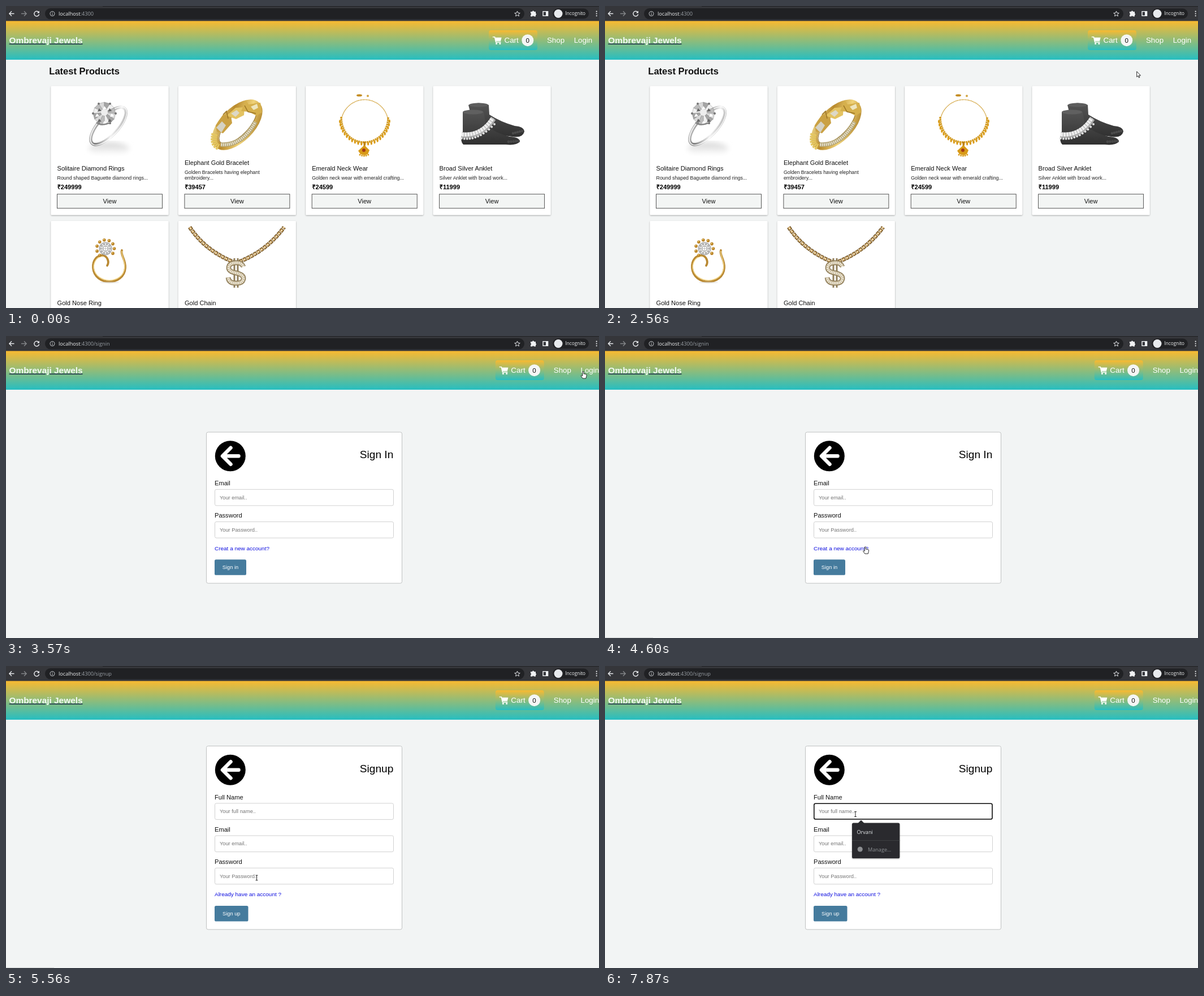
These frames come from a looping animation (1049x534 px, 8 s). An HTML page:

```html
<!DOCTYPE html>
<html lang="en">
<head>
<meta charset="utf-8">
<title>Jewellery shop</title>
<style>
html, body { margin: 0; width: 100%; height: 100%; overflow: hidden; background: #f2f4f4; }
svg { display: block; width: 100vw; height: 100vh; }
text { font-family: "Liberation Sans", Arial, sans-serif; white-space: pre; }
.ui text { font-family: "Open Sans", "Noto Sans", sans-serif; }
</style>
</head>
<body>
<svg id="stage" viewBox="0 0 1049 534"></svg>
<script>
const LOOP = 8000;
const stage = document.getElementById('stage');

const text = (x, y, size, str, fill = '#111', more = '') =>
  `<text x="${x}" y="${y}" font-size="${size}" fill="${fill}" ${more}>${str}</text>`;
const rect = (x, y, w, h, fill, more = '') =>
  `<rect x="${x}" y="${y}" width="${w}" height="${h}" fill="${fill}" ${more}/>`;
const circle = (x, y, r, fill, more = '') =>
  `<circle cx="${x}" cy="${y}" r="${r}" fill="${fill}" ${more}/>`;
const shape = (d, fill, more = '') => `<path d="${d}" fill="${fill}" ${more}/>`;
const line = (d, color, w, more = '') =>
  `<path d="${d}" fill="none" stroke="${color}" stroke-width="${w}" ${more}/>`;
const oval = (x, y, rx, ry, turn, more) =>
  `<ellipse rx="${rx}" ry="${ry}" transform="translate(${x} ${y}) rotate(${turn})" ${more}/>`;
const repeat = (n, fn) => Array.from({ length: n }, (_, i) => fn(i)).join('');
const polar = (x, y, r, deg) => {
  const a = deg * Math.PI / 180;
  return [(x + r * Math.cos(a)).toFixed(1), (y + r * Math.sin(a)).toFixed(1)];
};
const gradient = (id, stops, dir = 'x2="0" y2="1"') =>
  `<linearGradient id="${id}" x1="0" y1="0" ${dir}>` +
  stops.map((c, i) => `<stop offset="${i / (stops.length - 1)}" stop-color="${c}"/>`).join('') +
  '</linearGradient>';

const defs = `<defs>
  ${gradient('sky', ['#f9ba31', '#27bec1'])}
  ${gradient('silver', ['#eeeeee', '#777777', '#f4f4f4', '#999999'], 'x2="1" y2="1"')}
  ${gradient('gold', ['#f3df92', '#b98a2c', '#f0d37a', '#a87a22'], 'x2="1" y2="1"')}
  ${gradient('foot', ['#555555', '#303030'])}
  ${gradient('mirror', ['#d2d2d2', '#ffffff'])}
  <filter id="shade" x="-10%" y="-10%" width="120%" height="120%">
    <feDropShadow dx="0" dy="1" stdDeviation="1.3" flood-opacity=".38"/>
  </filter>
  <filter id="blur"><feGaussianBlur stdDeviation="5"/></filter>
</defs>`;

// Browser toolbar
const toolbar = `<g class="ui">
  ${rect(0, 0, 1049, 27, '#35363a')}${rect(171, 0, 878, 1, '#202124')}
  ${rect(69, 4, 848, 19.5, '#202124', 'rx="9.7"')}
  ${line('M14.5 13.5H6M10 9.3L5.8 13.5L10 17.7', '#e8eaed', 1.3)}
  ${line('M27 13.5H36M32 9.3L36.2 13.5L32 17.7', '#85878a', 1.3)}
  ${line('M57.8 11A4.4 4.4 0 1 0 58.6 14.5', '#e8eaed', 1.4)}${shape('M59 8.6V12.6H55Z', '#e8eaed')}
  ${circle(82, 13.7, 4, 'none', 'stroke="#c4c7ca"')}${line('M82 13V16M82 11V12', '#c4c7ca', 1)}
  ${text(93, 17, 9.2, 'localhost<tspan fill="#9aa0a6">:4300<tspan id="path"></tspan></tspan>', '#f1f3f4')}
  <polygon points="${repeat(10, i => polar(904.5, 14, i % 2 ? 2.2 : 5, i * 36 - 90) + ' ')}" fill="none" stroke="#dfe1e5"/>
  ${shape('M928 10H931V9.5A1.6 1.6 0 0 1 934 9.5V10H937V13A1.6 1.6 0 0 1 937 16V18.5H934A1.6 1.6 0 0 0 931 18.5H928V15.7A1.6 1.6 0 0 0 928 12.7Z', '#f1f3f4')}
  ${rect(950, 9.7, 8.6, 7.6, 'none', 'stroke="#f1f3f4" stroke-width="1.4"')}${rect(955, 9.7, 3.6, 7.6, '#f1f3f4')}
  ${rect(967, 4.5, 64, 18, '#202124', 'rx="9"')}${circle(977, 13.5, 7.5, '#e8eaed')}
  ${text(989.5, 16.4, 8.2, 'Incognito', '#f1f3f4')}
  ${repeat(3, i => circle(1044.7, 9.7 + i * 3.8, 1.1, '#e8eaed'))}
</g>`;

const header = `${rect(0, 26.5, 1049, 68.5, 'url(#sky)')}
  ${text(5.5, 65.5, 15.4, '<tspan fill="#f4faf4">Ombrevaji Jewels</tspan>', '#1d3048', 'font-weight="bold" text-decoration="underline"')}
  <g id="nav">
    ${rect(854, 43, 86, 35, 'url(#sky)', 'rx="4"')}
    ${line('M861.5 54.7H864.5L866.7 64H875', '#fff', 1.6, 'stroke-linejoin="round" stroke-linecap="round"')}
    ${shape('M864.8 55.7H876.6L875 62.2H866.3Z', '#fff')}
    ${circle(867.6, 66.4, 1.5, '#fff')}${circle(873.9, 66.4, 1.5, '#fff')}
    ${text(881.5, 65.2, 13.4, 'Cart', '#fff')}
    ${circle(922.8, 60.7, 10.5, '#f4f6f5')}${text(922.8, 64.8, 11.6, '0', '#111', 'text-anchor="middle"')}
    ${text(957, 65.2, 13.3, 'Shop', '#fff')}${text(1004.7, 65.2, 13.3, 'Login', '#fff')}
  </g>`;

// Product pictures
const spin = (x, y, r, n, fn) => repeat(n, i => fn(...polar(x, y, r, i * 360 / n), i));

const diamondRing = `
  ${oval(182, 252, 36, 11, 0, 'fill="url(#mirror)" filter="url(#blur)"')}
  ${oval(181, 212, 42, 17, -47, 'fill="none" stroke="url(#silver)" stroke-width="5.5"')}
  ${oval(181.5, 212, 43, 18, -47, 'fill="none" stroke="#fff" stroke-width="1.3"')}
  ${spin(174, 190, 20, 12, (x, y, i) => {
    const [u, v] = polar(174, 190, 20, (i + 1) * 30);
    return shape(`M174 188L${x} ${y}L${u} ${v}Z`, ['#d9d9d9', '#a5a5a5', '#f0f0f0', '#bcbcbc'][i % 4], 'stroke="#777" stroke-width=".4"');
  })}
  ${spin(174, 190, 13, 8, (x, y, i) => shape(`M${x} ${y}l4 5l-7 1z`, i % 2 ? '#666' : '#fff'))}
  ${circle(174, 188, 6, '#eee')}
  ${spin(174, 190, 20, 6, (x, y) => circle(x, y, 2, '#777'))}
  ${line('M160 206Q168 213 182 207', '#888', 2.5)}`;

const bracelet = `
  ${oval(409, 210, 49, 24, -45, 'fill="none" stroke="url(#gold)" stroke-width="12"')}
  ${oval(410, 211, 43, 18, -45, 'fill="#fff" stroke="#92712d" stroke-width="1"')}
  ${line('M380 245Q417 248 441 205', '#b5a574', 8)}
  ${line('M380 245Q417 248 441 205', '#e5e0cf', 5, 'stroke-dasharray="2 1.5"')}
  ${line('M369 226Q364 245 377 250', '#e5c761', 11, 'stroke-dasharray="3 1"')}
  ${shape('M371 211L384 192L398 195L400 207L384 225L373 222Z', '#caa144')}
  ${shape('M372 215L382 204L389 211L381 224Z', '#d5d2c4')}
  ${shape('M390 194L406 180L422 179L421 193L407 200Z', '#e4c362')}
  ${shape('M398 190L408 184L413 189L406 196Z', '#ddd8c7')}
  ${shape('M416 186L424 166L429 174L450 171L453 188L443 194L430 187Z', '#d6b04d')}
  ${shape('M433 178L444 173L446 180L438 184Z', '#eee5bd')}
  ${line('M384 192L390 186L393 199M422 176L428 187L442 190', '#9b7425', 1.5)}`;

const necklace = `
  ${line('M593 202A42 43 0 0 1 676 202', '#d3a643', 1.4, 'stroke-dasharray="2 .5"')}
  ${line('M593 196C593 226 614 241 634 241S676 226 676 196', '#d39c25', 3.5, 'stroke-dasharray="3 .8"')}
  ${repeat(23, i => {
    const [x, y] = polar(634.5, 200, 44, 5 + i * 7.7);
    return oval(x, y, 1.6, 3, 0, 'fill="#d99b18"');
  })}
  ${oval(625, 158, 5, 2, 0, 'fill="#c58e25"')}${circle(640, 159, 2, '#d3a643')}
  ${line('M634 240V250', '#b97d11', 3)}
  ${shape('M634 246L643 255L640 262L634 264L627 262L623 256Z', '#d89a17')}
  ${circle(633, 255, 3, '#a53b18')}${repeat(5, i => circle(626 + i * 3.7, 263 + 2 * Math.sin(i * .78), 1.5, '#d89a17'))}`;

const anklet = `
  ${shape('M818 175Q836 168 854 175L855 192Q875 205 900 212Q916 213 917 222Q914 234 896 231L830 222Z', 'url(#foot)')}
  ${shape('M808 188Q826 180 845 187L849 211Q865 224 891 231Q909 232 909 240Q903 247 884 245L809 245Q802 238 808 222Z', 'url(#foot)')}
  ${oval(836, 175, 17, 3.5, 0, 'fill="#5d5d5d"')}${oval(826, 187.5, 18, 4, 0, 'fill="#606060"')}
  ${repeat(5, i => circle(889 + i * 4.4, 240 - i * .3, 2.4, '#484848') + circle(897 + i * 4, 225 - i, 2.2, '#4c4c4c'))}
  ${line('M806 228Q842 232 862 199', '#aaa', 10)}
  ${line('M806 227Q841 230 861 198', '#eee', 7, 'stroke-dasharray="4 1"')}
  ${repeat(13, i => {
    const p = i / 12;
    return circle(806 + 58 * p, 234 + 11 * p - 36 * p * p, 2, '#ddd');
  })}`;

const noseRing = `
  ${line('M205 432C202 440 212 448 211 463C209 495 157 496 154 463C153 450 161 440 172 441C180 443 183 453 179 459', '#b98933', 3.8, 'stroke-linecap="round"')}
  ${line('M205 433C203 440 211 449 210 463C207 492 160 493 155 463C155 451 162 442 172 443', '#f1d487', 1.5)}
  ${spin(176, 429, 15.5, 11, (x, y, i) => i > 1 && i < 4 ? '' : circle(x, y, 2.8, '#b98225') + circle(x - .6, y - .8, 1.1, '#ecd07d'))}
  ${circle(176, 429, 11.5, '#aaa')}${circle(176, 429, 10, '#e9e9e9')}
  ${spin(176, 429, 8, 10, (x, y) => circle(x, y, 1.7, '#aaa'))}
  ${circle(176, 429, 4.5, '#fff', 'stroke="#888"')}${line('M172 429H180M176 425V433', '#aaa', .8)}
  ${oval(183, 489, 17, 1.5, 0, 'fill="#ddd" opacity=".6"')}`;

const links = 'M325 391Q352 432 401 452M413 452Q461 433 492 391';
const ess = 'M420 461Q417 453 406 454Q393 455 394 464Q395 470 407 472Q421 475 420 483Q418 491 406 490Q394 490 393 480';
const chain = `
  ${line(links, '#6f5328', 7, 'stroke-dasharray="6 1"')}
  ${line(links, '#c29a59', 4.6, 'stroke-dasharray="5 2"')}
  ${line(links, '#fff4d9', 1.6, 'stroke-dasharray="3 4" stroke-dashoffset="-1"')}
  ${line('M404 446V498M410 446V498', '#92805d', 3)}
  ${line(ess, '#85734f', 8.5)}${line(ess, '#c7b99a', 6)}
  ${line(ess, '#fbf8ef', 4, 'stroke-dasharray="1.3 1.8"')}`;

// Catalogue
const card = (x, y, pic, name, lines, price) => {
  const left = x + 11, base = y + 149 - (lines.length - 1) * 10;
  return rect(x, y, 208, 228, '#fff', 'rx="1.5" filter="url(#shade)"') + pic +
    text(left, base, 11.1, name) +
    lines.map((s, i) => text(left, base + 16.3 + i * 10, 8.85, s, '#222')).join('') +
    text(left, y + 182.7, 11.05, price, '#000', 'font-weight="bold"') +
    rect(left, y + 191.2, 186, 25, '#f3f5f4', 'stroke="#444" stroke-width=".9"') +
    text(x + 104, y + 207.2, 11.1, 'View', '#111', 'text-anchor="middle"');
};

const shop = `<g id="shop">
  ${text(76.3, 121, 16.5, 'Latest Products', '#111', 'font-weight="bold"')}
  ${card(79.5, 141.5, diamondRing, 'Solitaire Diamond Rings', ['Round shaped Baguette diamond rings...'], '₹249999')}
  ${card(304.9, 141.5, bracelet, 'Elephant Gold Bracelet', ['Golden Bracelets having elephant', 'embroidery...'], '₹39457')}
  ${card(530.2, 141.5, necklace, 'Emerald Neck Wear', ['Golden neck wear with emerald crafting...'], '₹24599')}
  ${card(755.6, 141.5, anklet, 'Broad Silver Anklet', ['Silver Anklet with broad work...'], '₹11999')}
  ${card(79.5, 380, noseRing, 'Gold Nose Ring', ['Outfitted nose ring specially for brides'], '₹8999')}
  ${card(304.9, 380, chain, 'Gold Chain', ['Golden broad chain with $ symbol embedded'], '₹49999')}
</g>`;

// Account forms
const form = (id, top, title, fields, link, button, width) => {
  const gap = 57.2, rest = top + gap * (fields.length - 1), cy = top + 42.2;
  return `<g id="${id}">
    ${rect(354.5, top, 346, 210 + rest - top, '#fff', 'rx="3" stroke="#bfc1c1"')}
    ${circle(396.8, cy, 27, '#000')}
    ${line(`M411.5 ${cy}H384M397.5 ${cy - 14.5}L383 ${cy}L397.5 ${cy + 14.5}`, '#fff', 6.5, 'stroke-linecap="round" stroke-linejoin="round"')}
    ${text(685.3, top + 46, 19.1, title, '#000', 'text-anchor="end"')}
    ${fields.map(([label, hint], i) => {
      const y = top + gap * i;
      return text(369, y + 94, 11.1, label) +
        rect(369.5, y + 101.3, 316, 28.6, '#fff', 'rx="2.6" stroke="#ccc" stroke-width=".9"') +
        text(378, y + 118.6, 9.25, hint, '#757575');
    }).join('')}
    ${text(369, rest + 151.3, 9.97, link, '#1010e0', 'class="link"')}
    ${rect(369, rest + 168, width, 27.6, '#457b9d', 'rx="2.6"')}
    ${text(369 + width / 2, rest + 185, 9.25, button, '#fff', 'text-anchor="middle"')}
  </g>`;
};
const email = ['Email', 'Your email..'], password = ['Password', 'Your Password..'];
const signin = form('signin', 170, 'Sign In', [email, password], 'Creat a new account?', 'Sign in', 56);
const signup = form('signup', 141.5, 'Signup', [['Full Name', 'Your full name..'], email, password],
  'Already have an account ?', 'Sign up', 59.5);

const extras = `
  ${rect(0, 533, 85, 1, '#d4d6d6', 'id="status"')}
  <g id="focus">${rect(369.8, 243.2, 315.2, 27.6, 'none', 'rx="2.6" stroke="#101010" stroke-width="1.6"')}</g>
  ${rect(378, 252, 1, 11, '#111', 'id="caret"')}
  <g id="popup" class="ui" filter="url(#shade)">
    ${shape('M447.5 278L453 272.5L458.5 278Z', '#292a2d')}${rect(437, 277.5, 84.3, 62.5, '#292a2d', 'rx="2.6"')}
    ${text(445.5, 296.8, 9.1, 'Orvani', '#e8eaed')}${rect(437, 308, 84.3, 1, '#3c4043')}
    ${circle(451.2, 324, 4.6, '#8c8e91')}${text(465, 327.6, 9.1, 'Manage...', '#8f9296')}
  </g>
  <g id="cursor">
    ${circle(0, 0, 8.5, '#d5dc1c', 'id="click" opacity=".8"')}
    <g stroke="#111" stroke-width=".9" stroke-linejoin="round">
      ${shape('M0 0V9.6L2.2 7.6L3.7 11L5.2 10.3L3.8 7.1H6.8Z', '#fff', 'id="arrow"')}
      ${shape('M-1.1 .7Q0 -.7 1.1 .7V4.4Q4.5 4.3 5.8 5.6Q6.4 6.4 5.8 8.8L4.8 12.5H-.8L-3.9 8.2Q-4 6.4 -1.1 7.8Z', '#fff', 'id="hand"')}
      ${shape('M-2 -4.4H2M0 -4.4V4.4M-2 4.4H2', 'none', 'id="beam"')}
    </g>
  </g>`;

stage.innerHTML = defs + rect(0, 0, 1049, 534, '#f2f4f4') + toolbar + header + shop + signin + signup + extras;

const el = id => document.getElementById(id);
const show = (id, on) => el(id).setAttribute('display', on ? 'inline' : 'none');

// Pointer moves: start, end, steps, first point, last point
const moves = [
  [640, 850, 4, 1020, 521, 798, 385],
  [1120, 1330, 4, 738, 384, 478, 467],
  [1730, 2010, 5, 546, 335, 873, 167],
  [2280, 3030, 11, 886, 152, 1021, 62.5],
  [4120, 4260, 3, 870, 136, 494, 364],
  [4600, 5020, 7, 460.5, 372.5, 443.5, 374.5],
  [6030, 6580, 9, 443.5, 367, 443, 262]
];

function pointer(t) {
  const [start, end, n, x0, y0, x1, y1] = moves.filter(m => t >= m[0]).pop() || moves[0];
  const k = Math.max(0, Math.min(n - 1, Math.floor((t - start) / (end - start) * (n - 1) + .001)));
  const p = k / (n - 1), ease = p * (1.5 - .5 * p);
  return [x0 + (x1 - x0) * ease, y0 + (y1 - y0) * ease];
}

function draw(t) {
  const within = (a, b) => t >= a && t < b;
  const page = t < 3570 ? 'shop' : t < 5560 ? 'signin' : 'signup';
  for (const id of ['shop', 'signin', 'signup']) show(id, id === page);
  el('path').textContent = page === 'shop' ? '' : '/' + page;
  el('nav').setAttribute('transform', `translate(${page === 'shop' ? 0 : 11.8} 0)`);
  document.querySelector('#signin .link').setAttribute('fill', t >= 5360 ? '#e00' : '#1010e0');

  const [x, y] = pointer(t);
  const hand = within(2880, 4120) || within(4600, 5560);
  const overField = [242, 300, 357].some(top => y >= top && y <= top + 29);
  const beam = page === 'signup' && overField;
  el('cursor').setAttribute('transform', `translate(${x.toFixed(1)} ${y.toFixed(1)})`);
  show('cursor', t >= 640);
  show('hand', hand);
  show('beam', beam);
  show('arrow', !hand && !beam);
  show('click', within(3300, 3570) || within(7310, 7600));

  show('status', within(4600, 6030));
  show('focus', t >= 7310);
  show('caret', within(7310, 7870));
  show('popup', t >= 7400);
}

const begin = performance.now();
function tick() {
  draw((performance.now() - begin) % LOOP);
  requestAnimationFrame(tick);
}
tick();
</script>
</body>
</html>
```
